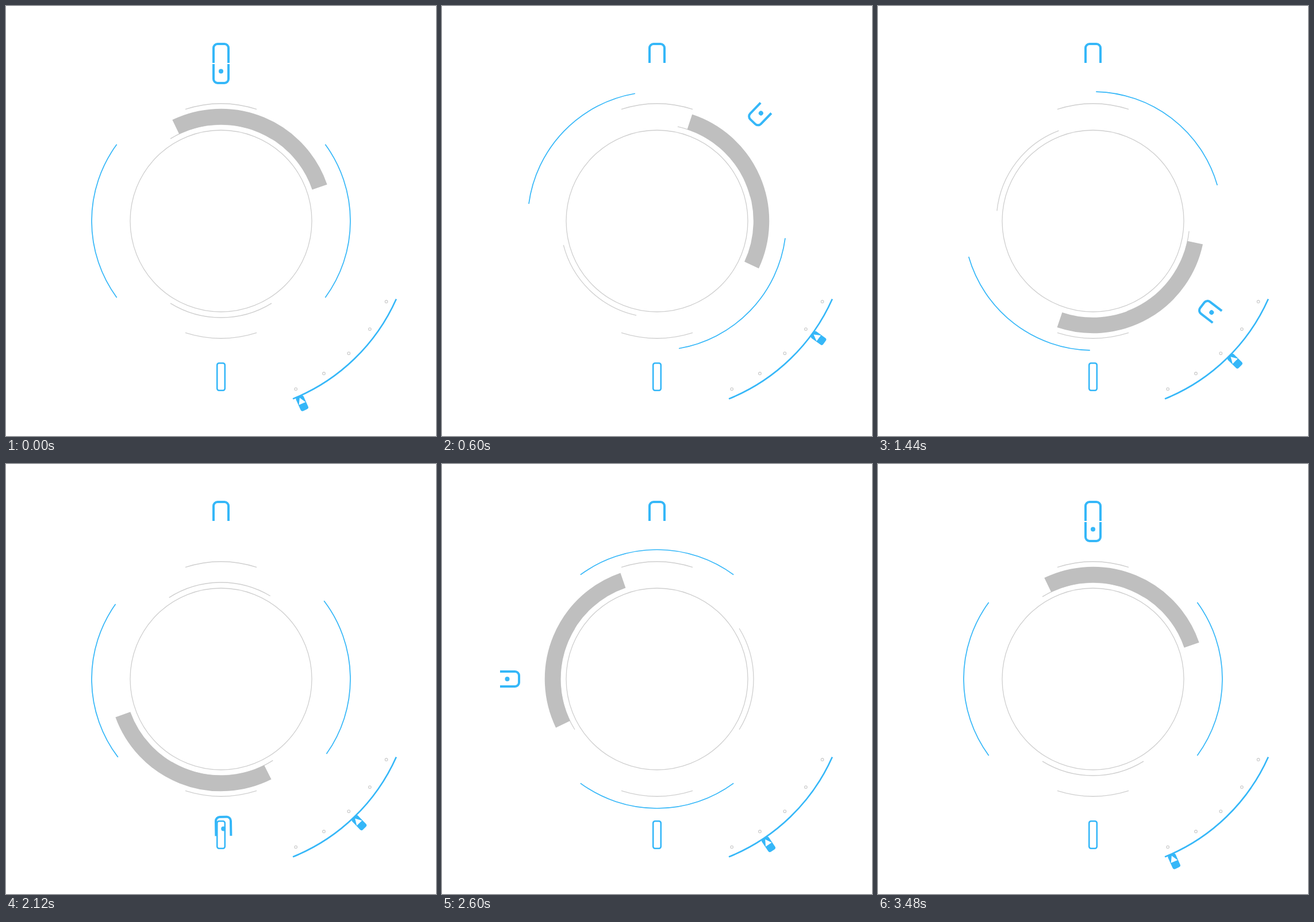
These frames come from a looping animation (748x748 px, 3.64 s). An HTML page:

```html
<!DOCTYPE html>
<html lang="en">
<head>
<meta charset="utf-8">
<title>Dial</title>
<style>
  html, body { margin: 0; width: 100%; height: 100%; overflow: hidden; background: #fff; }
  svg { display: block; width: 100vw; height: 100vh; }
  path, circle, rect { fill: none; }
  .blue { stroke: #35b7f8; }
  .gray { stroke: #cfcfcf; stroke-width: 1.3; }
  .fill { fill: #35b7f8; }
  .band { stroke: #bfbfbf; stroke-width: 27.5; }
</style>
</head>
<body>
<svg viewBox="0 0 748 748">
  <path class="blue" stroke-width="4" d="M361 99V73a7 7 0 0 1 7-7h12a7 7 0 0 1 7 7V99"/>
  <rect class="blue" stroke-width="2.6" x="367.2" y="621.2" width="13.6" height="47.6" rx="3.5"/>
  <g id="still"><circle class="gray" cx="374" cy="374" r="158"/></g>
  <g id="dial"></g>
  <g id="marker">
    <rect class="fill" x="366.8" y="14" width="14.4" height="26" rx="3.5"/>
    <path d="M374 37.5L380.3 26.5H367.7Z" style="fill:#fff"/>
  </g>
</svg>
<script>
const C = 374, LOOP = 3640, STEP = 40;
const $ = id => document.getElementById(id);

function add(parent, tag, attrs) {
  const el = document.createElementNS('http://www.w3.org/2000/svg', tag);
  for (const k in attrs) el.setAttribute(k, attrs[k]);
  parent.appendChild(el);
}

// Angles run clockwise from twelve o'clock, in degrees.
function polar(r, deg) {
  const a = deg * Math.PI / 180;
  return [C + r * Math.sin(a), C - r * Math.cos(a)];
}

function arc(parent, r, from, to, attrs) {
  const d = `M${polar(r, from)}A${r} ${r} 0 0 1 ${polar(r, to)}`;
  add(parent, 'path', { d, ...attrs });
}

const still = $('still'), dial = $('dial'), marker = $('marker');
const thin = { class: 'gray' };

for (const mid of [0, 180]) {
  arc(still, 204, mid - 17.7, mid + 17.7, thin);
  arc(dial, 168, mid - 31.6, mid + 31.6, thin);
  arc(dial, 225, mid + 53.7, mid + 126.3, { class: 'blue', 'stroke-width': 1.7 });
}
arc(dial, 181.5, -25.7, 71, { class: 'band' });
add(dial, 'path', {
  class: 'blue', 'stroke-width': 4,
  d: 'M361 101V127a7 7 0 0 0 7 7h12a7 7 0 0 0 7-7V101'
});
add(dial, 'circle', { class: 'fill', cx: C, cy: 113.5, r: 4 });

arc(still, 333.7, 114, 158, { class: 'blue', 'stroke-width': 2.6 });
for (let a = 116; a <= 156; a += 10) {
  const [cx, cy] = polar(320, a);
  add(still, 'circle', { class: 'gray', cx, cy, r: 2.3 });
}

function bezier(x1, y1, x2, y2) {
  const at = (a, b, s) => 3 * s * (1 - s) ** 2 * a + 3 * s * s * (1 - s) * b + s ** 3;
  return x => {
    if (x <= 0) return 0;
    if (x >= 1) return 1;
    let lo = 0, hi = 1;
    for (let i = 0; i < 30; i++) {
      const m = (lo + hi) / 2;
      if (at(x1, x2, m) < x) lo = m; else hi = m;
    }
    return at(y1, y2, lo);
  };
}

const windUp = bezier(.75, -.14, .5, 1);
const glide = bezier(.4, 0, .2, 1);

// Start and end of each quarter turn and of each marker step, in ms.
const turns = [[290, 800], [1160, 1640], [2080, 2600], [3000, 3480]];
const slides = [[240, 640], [1160, 1640], [2080, 2600], [3000, 3480]];

const progress = (t, spans, ease) =>
  spans.reduce((sum, [a, b]) => sum + ease((t - a) / (b - a)), 0);

function draw(ms) {
  const t = Math.floor((ms % LOOP) / STEP) * STEP;
  const turn = 90 * progress(t, turns, windUp);
  const slide = t < slides[0][0] ? 156 : 116 + 10 * progress(t, slides, glide);
  dial.setAttribute('transform', `rotate(${turn} ${C} ${C})`);
  marker.setAttribute('transform', `rotate(${slide} ${C} ${C})`);
}

const start = performance.now();
function tick() {
  draw(performance.now() - start);
  requestAnimationFrame(tick);
}
tick();
</script>
</body>
</html>
```
